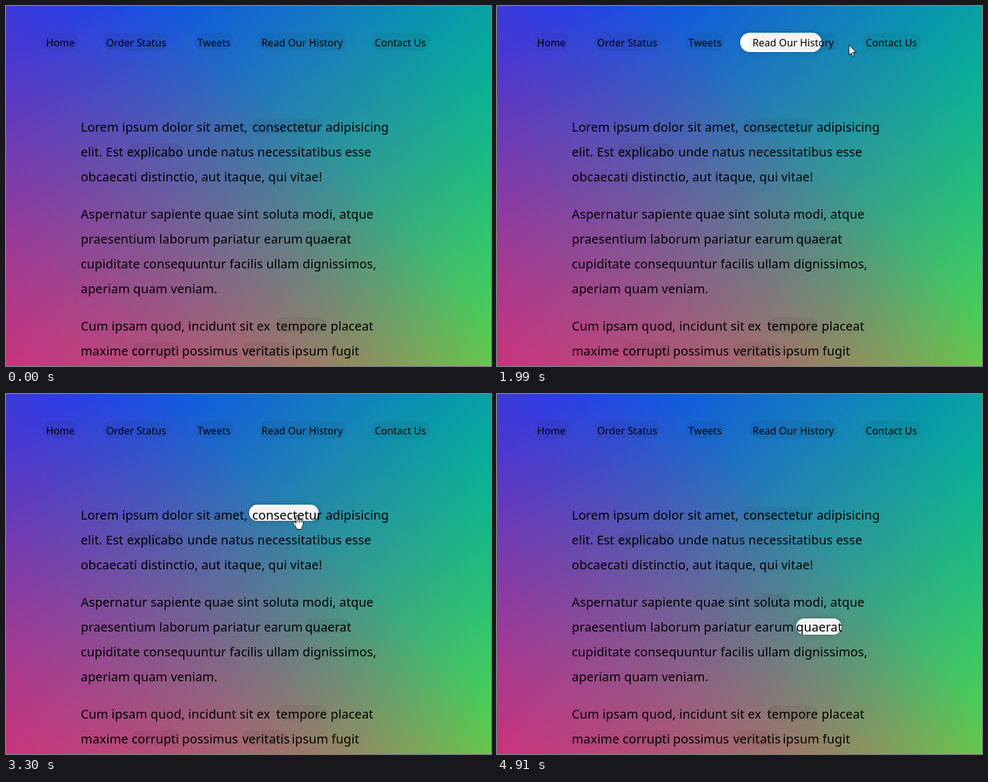
An HTML page for the animation above (5.46 s loop, 780 by 579 pixels).

```html
<!DOCTYPE html>
<html lang="en">
<head>
<meta charset="utf-8">
<title>Follow-along links</title>
<style>
  html, body { margin: 0; width: 100%; height: 100%; overflow: hidden; }
  #stage { position: relative; width: 780px; height: 579px; overflow: hidden; }
  #backdrop {
    position: absolute; left: -38px; top: -57px; width: 818px; height: 1035px;
    background:
      linear-gradient(45deg, hsla(340, 100%, 55%, 1) 0%, hsla(340, 100%, 55%, 0) 70%),
      linear-gradient(135deg, hsla(225, 95%, 50%, 1) 10%, hsla(225, 95%, 50%, 0) 80%),
      linear-gradient(225deg, hsla(140, 90%, 50%, 1) 10%, hsla(140, 90%, 50%, 0) 80%),
      hsl(35, 95%, 55%);
  }
  #highlight {
    position: absolute; left: 0; top: 0; background: #fff;
    border-radius: 20px; box-shadow: 0 0 10px rgba(0, 0, 0, .2);
  }
  svg { position: absolute; left: 0; top: 0; }
  text { font-family: "Noto Sans", "Open Sans", sans-serif; letter-spacing: .12px; }
</style>
</head>
<body>
<div id="stage">
  <div id="backdrop"></div>
  <div id="highlight"></div>
  <svg width="780" height="579" viewBox="0 0 780 579">
    <g id="pills" fill="#000" fill-opacity=".05"></g>
    <g id="words"></g>
    <g id="pointer" stroke="#000" stroke-linejoin="round" fill="#fff">
      <path id="arrow" d="M.5 .5V17L4.3 13.4L6.8 19L9.2 18L6.8 12.4H12Z"/>
      <g id="hand">
        <path d="M-1.5 13V2Q-1.5 .5 0 .5T1.5 2V7Q3.8 5.6 4.5 7.8Q6.8 6.6 7.4 8.8Q9.8 8 10 10.5V14.5Q9.8 17 8 19V22.5H-1V20L-5.5 14Q-7 11.4-5 10.6Q-3.6 10.4-1.5 13Z"/>
        <path d="M1.5 7V12M4.5 8V12M7.4 9V12" fill="none"/>
      </g>
    </g>
  </svg>
</div>
<script>
const LOOP = 5460, START = 380, LAST = 4910, STEP = (LAST - START) / 59;
const $ = id => document.getElementById(id);
const links = {};

function add(parent, tag, attrs) {
  const el = document.createElementNS("http://www.w3.org/2000/svg", tag);
  for (const key in attrs) el.setAttribute(key, attrs[key]);
  return $(parent).appendChild(el);
}

function write(x, y, size, content) {
  add("words", "text", { x, y, "font-size": size }).textContent = content;
}

function addLink(name, x, y, width, height) {
  const el = add("pills", "rect", { x, y, width, height, rx: height / 2 });
  links[name] = { el, box: [x, y, width, height + 2] };
}

// Navigation: label, left edge, width
[["Home", 59.5, 57], ["Order Status", 156, 107], ["Tweets", 303, 63],
 ["Read Our History", 406, 142], ["Contact Us", 588, 94]].forEach(([label, x, width]) => {
  addLink(label, x, 43, width, 29);
  write(x + 5, 65, 16, label);
});

// Text lines: baseline, then runs of [text, x, link width]
const LEFT = 120.3;
[
  [202, ["Lorem ipsum dolor sit amet,", LEFT], ["consectetur", 396, 112], ["adipisicing", 514]],
  [242, ["elit. Est", LEFT], ["explicabo", 194.5, 91], ["unde natus necessitatibus esse", 291.5]],
  [282, ["obcaecati distinctio, aut itaque, qui vitae!", LEFT]],
  [342, ["Aspernatur sapiente quae sint", LEFT], ["soluta", 413, 58], ["modi, atque", 476.5]],
  [382, ["praesentium laborum pariatur earum", LEFT], ["quaerat", 481, 73]],
  [422, ["cupiditate consequuntur facilis ullam dignissimos,", LEFT]],
  [462, ["aperiam quam veniam.", LEFT]],
  [522, ["Cum ipsam quod, incidunt sit ex", LEFT], ["tempore", 434.5, 82], ["placeat", 522]],
  [562, ["maxime", LEFT], ["corrupti", 202, 76], ["possimus", 283], ["veritatis", 380, 74], ["ipsum fugit", 459.5]],
].forEach(([y, ...runs]) => runs.forEach(([content, x, width]) => {
  if (width) addLink(content, x, y - 21, width, 24);
  write(x, y, 20, content);
}));

const hovers = [
  [985, "Home"], [1550, "Order Status"], [1705, "Tweets"], [1880, "Read Our History"],
  [2070, "Contact Us"], [2340, "Read Our History"], [2425, "Tweets"], [2480, "Order Status"],
  [3135, "consectetur"], [3590, "explicabo"], [4150, "soluta"], [4440, "quaerat"],
];

// Pointer path: time, x, y
const path = [
  [450, 170, 510], [610, 150, 330], [760, 152, 115], [920, 95, 68], [1070, 57, 43],
  [1300, 57, 43], [1460, 90, 55], [1705, 303, 62], [1880, 410, 62], [1990, 564, 62],
  [2180, 690, 66], [2290, 660, 64], [2490, 220, 71], [2610, 58, 80], [2690, 76, 88],
  [2900, 200, 150], [3135, 397, 192], [3300, 469, 195], [3450, 440, 208], [3600, 280, 238],
  [3840, 242, 245], [4000, 320, 290], [4150, 415, 330], [4300, 450, 342], [4450, 488, 368],
  [4600, 510, 375], [4750, 530, 440], [4860, 545, 565],
];

const mix = (a, b, k) => a.map((v, i) => v + (b[i] - v) * k);

// CSS "ease": cubic-bezier(.25, .1, .25, 1)
function ease(x) {
  if (x >= 1) return 1;
  const bezier = (a, b, s) => 3 * a * s * (1 - s) ** 2 + 3 * b * s * s * (1 - s) + s ** 3;
  let low = 0, high = 1;
  for (let i = 0; i < 20; i++) {
    const mid = (low + high) / 2;
    if (bezier(.25, .25, mid) < x) low = mid; else high = mid;
  }
  return bezier(.1, 1, low);
}

// Each hover starts a 200 ms transition from wherever the last one had got to.
function highlightBox(t, i = hovers.findLastIndex(h => h[0] <= t)) {
  if (i < 0) return null;
  const [time, name] = hovers[i], goal = links[name].box;
  return i ? mix(highlightBox(time, i - 1), goal, ease((t - time) / 200)) : goal;
}

function pointerAt(t) {
  const i = path.findIndex(p => p[0] > t);
  if (i < 1) return null;
  const a = path[i - 1], b = path[i];
  return mix(a, b, (t - a[0]) / (b[0] - a[0])).slice(1);
}

const inside = (x, y) => Object.values(links).some(({ box: [l, t, w, h] }) =>
  x >= l && x <= l + w && y >= t && y <= t + h);

const show = (el, on) => { el.style.display = on ? "" : "none"; };

function draw(time) {
  const steps = Math.floor((time - START) / STEP + .1);
  const t = time < START ? 0 : Math.min(LAST, START + steps * STEP);

  const box = highlightBox(t);
  show($("highlight"), box);
  if (box) {
    const [x, y, w, h] = box;
    Object.assign($("highlight").style, {
      transform: `translate(${x}px, ${y}px)`, width: w + "px", height: h + "px",
    });
  }
  show(links.soluta.el, t > 4150);

  const tip = pointerAt(t);
  show($("pointer"), tip);
  if (tip) {
    const [x, y] = tip, over = inside(x, y);
    $("pointer").setAttribute("transform", `translate(${x} ${y})`);
    show($("hand"), over);
    show($("arrow"), !over);
  }
}

const origin = performance.now();
function tick() {
  draw((performance.now() - origin) % LOOP);
  requestAnimationFrame(tick);
}
tick();
</script>
</body>
</html>
```
